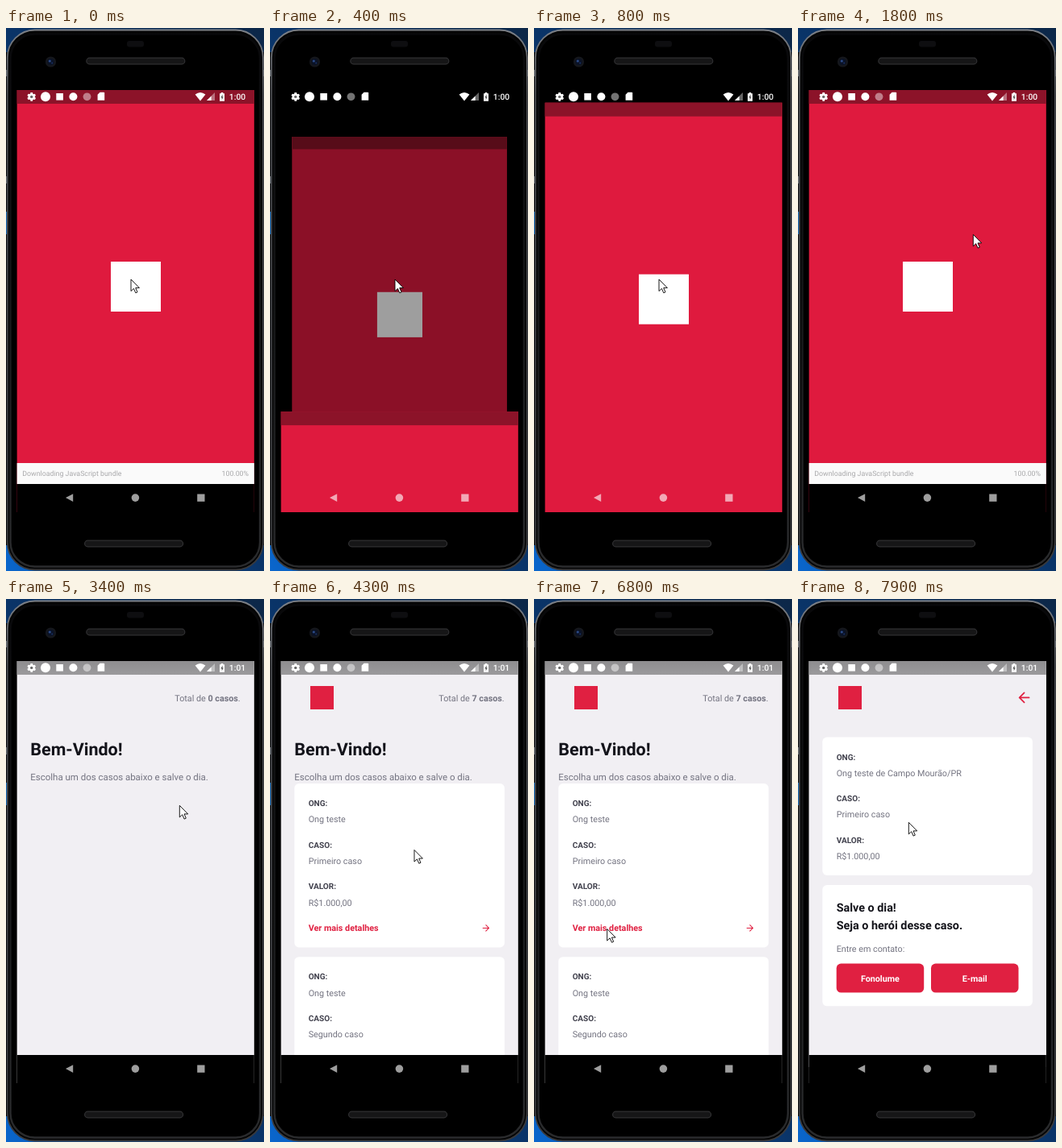
An HTML page that plays this animation: 320 px wide and 674 px high, repeating every 8 s.

```html
<!DOCTYPE html>
<html lang="pt">
<head>
<meta charset="utf-8">
<title>App demo</title>
<style>
html, body { margin: 0; width: 100%; height: 100%; overflow: hidden; background: #000; }
svg { display: block; width: 100vw; height: 100vh; }
text { font-family: Roboto, sans-serif; text-rendering: geometricPrecision; white-space: pre; }
.bar { font-size: 8.8px; fill: #a9a9ab; }
.label { font-size: 10.05px; font-weight: 700; fill: #41414d; }
.value { font-size: 10.77px; fill: #737380; }
.link { font-size: 10.77px; font-weight: 700; fill: #e02041; }
.btn { font-size: 10.77px; font-weight: 700; fill: #fff; text-anchor: middle; }
.title { font-size: 21.53px; font-weight: 700; fill: #13131a; }
.desc { font-size: 11.48px; fill: #737380; }
.hero { font-size: 14.36px; font-weight: 700; fill: #13131a; }
.clock { font-size: 10.3px; font-weight: 500; fill: #fff; }
.end { text-anchor: end; }
.b { font-weight: 700; }
</style>
</head>
<body>
<svg id="stage" viewBox="0 0 320 674" preserveAspectRatio="none"></svg>
<script>
const DURATION = 8000;
const RED = '#df1a3e';
const LEFT = 13.4, WIDTH = 294.5;

const rect = (x, y, w, h, fill, extra = '') =>
  `<rect x="${x}" y="${y}" width="${w}" height="${h}" fill="${fill}" ${extra}/>`;
const band = (y, h, fill, extra) => rect(LEFT, y, WIDTH, h, fill, extra);
const circle = (x, y, r, fill, extra = '') =>
  `<circle cx="${x}" cy="${y}" r="${r}" fill="${fill}" ${extra}/>`;
const path = (d, fill, extra = '') => `<path d="${d}" fill="${fill}" ${extra}/>`;
const text = (x, y, cls, s, extra = '') =>
  `<text x="${x}" y="${y}" class="${cls}" ${extra}>${s}</text>`;
const card = (y, h) => rect(30.3, y, 260.6, h, '#fff', 'rx="5.7"');
const arrow = (x, y, size, dir) =>
  `<path transform="translate(${x} ${y}) scale(${dir * size / 24} ${size / 24})"
    d="M-7 0H7M0-7L7 0L0 7" fill="none" stroke="#e02041" stroke-width="2"
    stroke-linecap="round" stroke-linejoin="round"/>`;

// Label and value pairs, one below the other
const fields = (y, pairs) => pairs.map(([label, value], i) =>
  text(47.7, y + i * 51.6, 'label', label) +
  text(47.7, y + 20.3 + i * 51.6, 'value', value)).join('');

function phone() {
  const slot = (x, y) =>
    rect(x, y, 122, 7.6, '#161617', 'rx="3.8" stroke="#303032" stroke-width="1.2"');
  return rect(0, 0, 320, 674, 'url(#desk)') +
    rect(0, 30, 3, 612, '#0c0d0f') +
    rect(317, 30, 3, 612, '#0c0d0f') +
    rect(0, 228, 3, 28, '#1470c4') +
    rect(0, 52, 320, 8, '#6d7278') +
    rect(0, 184, 4, 9, '#6d7278') +
    rect(1.8, 2.5, 317, 670, '#050505', 'rx="34" stroke="url(#rim)" stroke-width="1.8"') +
    rect(5.5, 7.5, 309.5, 661, '#000', 'rx="30" stroke="url(#bevel)" stroke-width="2.4"') +
    rect(150, 16, 21, 7.5, '#0e0e10', 'rx="3"') +
    slot(99.8, 37.2) + slot(97.6, 636.2) +
    circle(55.5, 42, 6.6, '#15171c') + circle(55.5, 42, 4, '#0a1226') +
    circle(54.3, 41, 1.6, '#2b4a86') + circle(57.2, 43.6, 1, '#1c3263');
}

function splash(id) {
  return `<g id="${id}">` +
    band(77, 524, RED) +
    band(77, 17, '#8c1329') +
    rect(130, 290, 62, 62, '#fff') +
    `<g id="${id}Bar">` +
      band(540, 26, '#fafafa') +
      band(566, 35, '#000') +
      text(20.3, 556.3, 'bar', 'Downloading JavaScript bundle') +
      text(301, 556.3, 'bar end', '100.00%', `id="${id}Pct"`) +
    '</g>' +
    band(77, 524, '#000', `id="${id}Dim" opacity="0"`) +
    '</g>';
}

function home() {
  const total = (id, n) => text(290.7, 127, 'value end',
    `Total de <tspan class="b">${n} casos</tspan>.`, `id="${id}"`);
  return '<g id="home">' +
    band(77, 524, '#f1eff3') +
    rect(50, 108, 29, 29, '#e02041', 'id="homeMark"') +
    total('none', 0) + total('some', 7) +
    text(30.3, 194.3, 'title', 'Bem-Vindo!') +
    text(30.3, 225, 'desc', 'Escolha um dos casos abaixo e salve o dia.') +
    '<g id="cards">' +
      card(229, 203.5) +
      fields(257, [['ONG:', 'Ong teste'], ['CASO:', 'Primeiro caso'], ['VALOR:', 'R$1.000,00']]) +
      text(47.7, 412.3, 'link', 'Ver mais detalhes') +
      arrow(267.8, 408.4, 12.6, 1) +
      card(444.2, 203.5) +
      fields(472.2, [['ONG:', 'Ong teste'], ['CASO:', 'Segundo caso']]) +
    '</g></g>';
}

function detail() {
  const button = (x, s) =>
    rect(x, 452.6, 108.5, 36, '#e02041', 'rx="5.7"') + text(x + 54.2, 474.7, 'btn', s);
  return '<g clip-path="url(#reveal)"><g id="detail">' +
    band(77, 524, '#f1eff3') +
    rect(50, 108, 29, 29, '#e02041') +
    arrow(280.6, 122.4, 20.5, -1) +
    card(171.5, 171.5) +
    fields(199.5, [['ONG:', 'Ong teste de Campo Mourão/PR'],
      ['CASO:', 'Primeiro caso'], ['VALOR:', 'R$1.000,00']]) +
    card(355, 150.3) +
    text(47.7, 388.2, 'hero', 'Salve o dia!') +
    text(47.7, 409.8, 'hero', 'Seja o herói desse caso.') +
    text(47.7, 438.3, 'value', 'Entre em contato:') +
    button(47.7, 'Fonolume') + button(165, 'E-mail') +
    '</g></g>';
}

function statusIcons() {
  const teeth = [0, 60, 120].map(a =>
    rect(30.3, 80, 2.8, 10.8, '#fff', `rx=".6" transform="rotate(${a} 31.7 85.4)"`)).join('');
  return teeth +
    circle(31.7, 85.4, 3, 'none', 'stroke="#fff" stroke-width="2.4"') +
    circle(31.7, 85.4, 1.7, '#666') +
    circle(49, 85.3, 6, '#fff') +
    rect(62.3, 81, 8.6, 8.6, '#fff') +
    circle(83.4, 85.3, 5, '#fff') +
    circle(100.5, 85.3, 4.9, '#fff', 'opacity=".45"') +
    path('M116.5 79.8H121.2Q122.2 79.8 122.2 80.8V89.8H113.6V82.7Z', '#fff') +
    path('M241 90.6L234.6 82.6Q241 77.4 247.4 82.6Z', '#fff') +
    path('M249 90L259 80V90Z', '#fff', 'opacity=".4"') +
    path('M249 90L254.6 84.4V90Z', '#fff') +
    path('M265 81.2H266.7V79.9H269.3V81.2H271V90.7H265Z', '#fff') +
    path('M268.6 82.6L266.3 86.5H267.7V89.3L269.8 85.5H268.6Z', '#555') +
    text(276.8, 89, 'clock', '', 'id="clock"');
}

const navIcons = () => '<g opacity=".62">' +
  path('M83.2 578.2V587.9L74 583Z', '#fff') +
  circle(160.4, 583.1, 4.8, '#fff') +
  rect(237.2, 578.5, 9.3, 9.3, '#fff') + '</g>';

const gradient = (id, attrs, ...colors) =>
  `<linearGradient id="${id}" ${attrs}>` + colors.map(([at, c]) =>
    `<stop offset="${at}" stop-color="${c}"/>`).join('') + '</linearGradient>';

const stage = document.getElementById('stage');
stage.innerHTML = '<defs>' +
  gradient('desk', 'x1="1" x2="0" y2="1"', [0, '#0c2748'], [0.5, '#0a3468'], [1, '#0a66cc']) +
  gradient('rim', 'x2="0" y2="1"', [0, '#7d8188'], [0.12, '#4a4c50'], [1, '#38393c']) +
  gradient('bevel', 'x2="0" y2="1"', [0, '#08080a'], [0.5, '#161718'], [1, '#2a2b2d']) +
  gradient('grey', 'x2="0" y2="1"', [0, '#8e8d8f'], [1, '#9b9a9c']) +
  `<clipPath id="screen">${band(77, 524)}</clipPath>
   <clipPath id="reveal">${band(77, 524, '', 'id="revealBox"')}</clipPath></defs>` +
  phone() +
  '<g clip-path="url(#screen)">' +
    splash('back') + splash('front') +
    '<g id="app">' + home() + detail() +
      band(77, 17, 'url(#grey)') +
      band(566, 35, '#000') +
    '</g>' + statusIcons() + navIcons() +
  '</g>' +
  path('M0 0V14.6L3.4 11.4L5.8 16.8L8 15.8L5.7 10.6H10.4Z', '#fff',
    'id="cursor" stroke="#000" stroke-width=".9" stroke-linejoin="round"');

const el = {};
stage.querySelectorAll('[id]').forEach(n => el[n.id] = n);

const show = (node, on) => node.setAttribute('visibility', on ? 'inherit' : 'hidden');
const move = (node, x, y) => node.setAttribute('transform', `translate(${x} ${y})`);
const phase = (t, a, b) => Math.min(1, Math.max(0, (t - a) / (b - a)));
const easeOut = (p, n) => 1 - (1 - p) ** n;
const smooth = p => p * p * (3 - 2 * p);
const mix = (a, b, p) => a + (b - a) * p;

// Pointer stops: time, x, y
const stops = [
  [0, 155, 312], [1000, 155, 312], [1700, 217.3, 256.3], [1900, 217.3, 256.3],
  [2300, 215.3, 256.3], [4150, 215.3, 256.3], [4500, 124, 395], [4950, 279, 130],
  [5300, 257.4, 131], [5900, 156, 353], [6300, 68, 419], [6650, 90.7, 409.5],
  [7050, 90.7, 409.5], [7600, 137.3, 277.3], [DURATION, 137.3, 277.3]
];

function pointer(t) {
  const i = Math.max(1, stops.findIndex(s => s[0] >= t));
  const [t0, x0, y0] = stops[i - 1], [t1, x1, y1] = stops[i];
  const p = smooth(phase(t, t0, t1));
  return [mix(x0, x1, p), mix(y0, y1, p)];
}

function render(t) {
  // The old task shrinks and dims while the new one slides up
  const shrink = easeOut(phase(t, 50, 500), 2);
  el.back.setAttribute('transform',
    `translate(160.6 ${mix(77, 138, shrink)}) scale(${mix(1, 0.9, shrink)}) translate(-160.6 -77)`);
  el.backDim.setAttribute('opacity', 0.4 * shrink);
  show(el.back, t < 900);

  move(el.front, 0, 577 * (1 - easeOut(phase(t, 300, 900), 2)));
  show(el.front, t >= 300 && t < 3300);
  show(el.frontBar, t >= 850);
  el.frontPct.textContent = (100 * phase(t, 1000, 1600)).toFixed(2) + '%';

  const loaded = t >= 3800;
  show(el.app, t >= 3300);
  show(el.homeMark, t >= 3600);
  show(el.none, !loaded);
  show(el.some, loaded);
  show(el.cards, loaded);

  const open = easeOut(phase(t, 7000, 7425), 3);
  move(el.home, 0, -20 * open);
  move(el.detail, 0, 20 * (1 - open));
  el.revealBox.setAttribute('y', 566 - 489 * open);
  show(el.detail, open > 0);

  el.clock.textContent = t < 2300 ? '1:00' : '1:01';
  move(el.cursor, ...pointer(t));
}

const start = performance.now();
function frame() {
  render((performance.now() - start) % DURATION);
  requestAnimationFrame(frame);
}
render(0);
requestAnimationFrame(frame);
</script>
</body>
</html>
```
